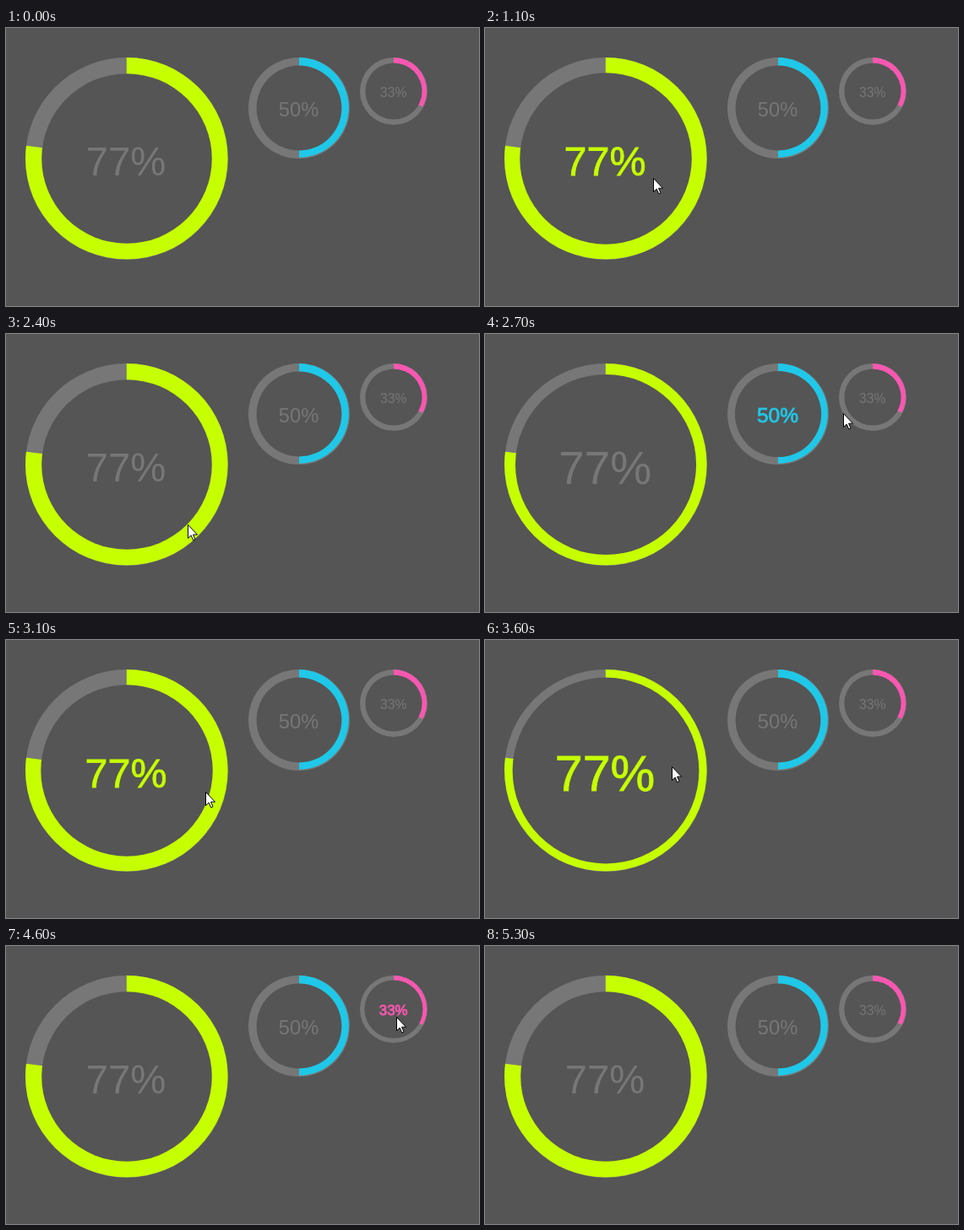
Recreate the animation shown at these times as an HTML page with a canvas. Size 560 px wide and 330 px high, loop 5700 ms.

```html
<!DOCTYPE html>
<html lang="en">
<head>
<meta charset="utf-8">
<title>Percentage circles</title>
<style>
  html, body { margin: 0; width: 100%; height: 100%; overflow: hidden; background: #555; }
  canvas { display: block; }
</style>
</head>
<body>
<canvas id="stage" width="560" height="330"></canvas>
<script>
const ctx = document.getElementById('stage').getContext('2d');
const LOOP = 5700, STEP = 100;            // ms per loop, ms per picture
const FADE = 200, LAG = 60, TICK = 5;     // hover duration, reaction delay, simulation step
const BACK = '#555', GREY = '#777';

const circles = [
  { x: 143, y: 155, size: 240, percent: 77, color: '#c6ff00' },
  { x: 347, y: 95, size: 120, percent: 50, color: '#1fc8e8' },
  { x: 459, y: 75, size: 80, percent: 33, color: '#f957b1' }
];

// Turning points of the pointer: [time, x, y]
const path = [
  [1000, 186, 282], [1100, 199, 178], [1300, 215, 124], [1420, 290, 134],
  [1600, 354, 147], [1900, 480, 82], [2150, 440, 160], [2400, 215, 226],
  [2500, 180, 195], [2720, 448, 84], [2900, 296, 178], [3100, 236, 180],
  [3300, 30, 172], [3800, 348, 136], [4100, 352, 181], [4600, 462, 84],
  [4900, 444, 240], [5000, 436, 298]
];
const arrow = new Path2D('M.5 .5V16.5L4.2 13.1 6.7 18.8 9 17.8 6.5 12.2H11.5Z');

function pointerAt(t) {
  const next = path.findIndex(point => point[0] > t);
  if (next < 1) return null;
  const [t0, x0, y0] = path[next - 1], [t1, x1, y1] = path[next];
  const k = (t - t0) / (t1 - t0);
  return { x: x0 + (x1 - x0) * k, y: y0 + (y1 - y0) * k };
}

function isHovered({ x, y, size }, t) {
  const pointer = pointerAt(t - LAG);
  return pointer !== null && Math.hypot(pointer.x - x, pointer.y - y) < size / 2;
}

// Replays the hover transition, which rises or falls at a constant rate
function hoverAmount(circle, t) {
  let amount = 0;
  for (let s = path[0][0]; s < t; s += TICK) {
    const change = isHovered(circle, s) ? TICK / FADE : -TICK / FADE;
    amount = Math.min(1, Math.max(0, amount + change));
  }
  return amount;
}

function disc(x, y, radius, color, turn = 1) {
  ctx.fillStyle = color;
  ctx.beginPath();
  if (turn < 1) ctx.moveTo(x, y);
  ctx.arc(x, y, radius, -Math.PI / 2, (turn * 2 - 0.5) * Math.PI);
  ctx.fill();
}

function drawCircle(circle, t) {
  const { x, y, size, percent, color } = circle;
  const amount = hoverAmount(circle, t);
  const hovered = isHovered(circle, t);
  // The bar's border is a whole number of pixels, so it sits slightly up and left
  const shift = 0.08 * size % 1;
  disc(x, y, size / 2, GREY);
  ctx.save();
  if (percent <= 50) {
    ctx.beginPath();
    ctx.rect(x, y - size / 2, size / 2, size);
    ctx.clip();
  }
  disc(x - shift, y - shift, size / 2 - shift, color, percent / 100);
  ctx.restore();
  disc(x, y, size * (0.42 + 0.04 * amount), BACK);

  const fontSize = size * (0.197 + 0.05 * amount);
  const textX = x - size / 240, textY = y + 0.0125 * size + 0.36 * fontSize;
  ctx.font = `${fontSize}px "Liberation Sans", Arial, sans-serif`;
  ctx.textAlign = 'center';
  ctx.fillStyle = ctx.strokeStyle = hovered ? color : GREY;
  ctx.fillText(percent + '%', textX, textY);
  if (hovered) {
    ctx.lineWidth = 0.8;
    ctx.strokeText(percent + '%', textX, textY);
  }
}

function drawPointer(t) {
  const pointer = pointerAt(t);
  if (!pointer) return;
  ctx.save();
  ctx.translate(Math.round(pointer.x), Math.round(pointer.y));
  ctx.lineWidth = 1;
  ctx.fillStyle = '#fff';
  ctx.strokeStyle = '#000';
  ctx.fill(arrow);
  ctx.stroke(arrow);
  ctx.restore();
}

function draw() {
  const t = Math.floor(performance.now() % LOOP / STEP) * STEP;
  ctx.fillStyle = BACK;
  ctx.fillRect(0, 0, 560, 330);
  circles.forEach(circle => drawCircle(circle, t));
  drawPointer(t);
  requestAnimationFrame(draw);
}
draw();
</script>
</body>
</html>
```
